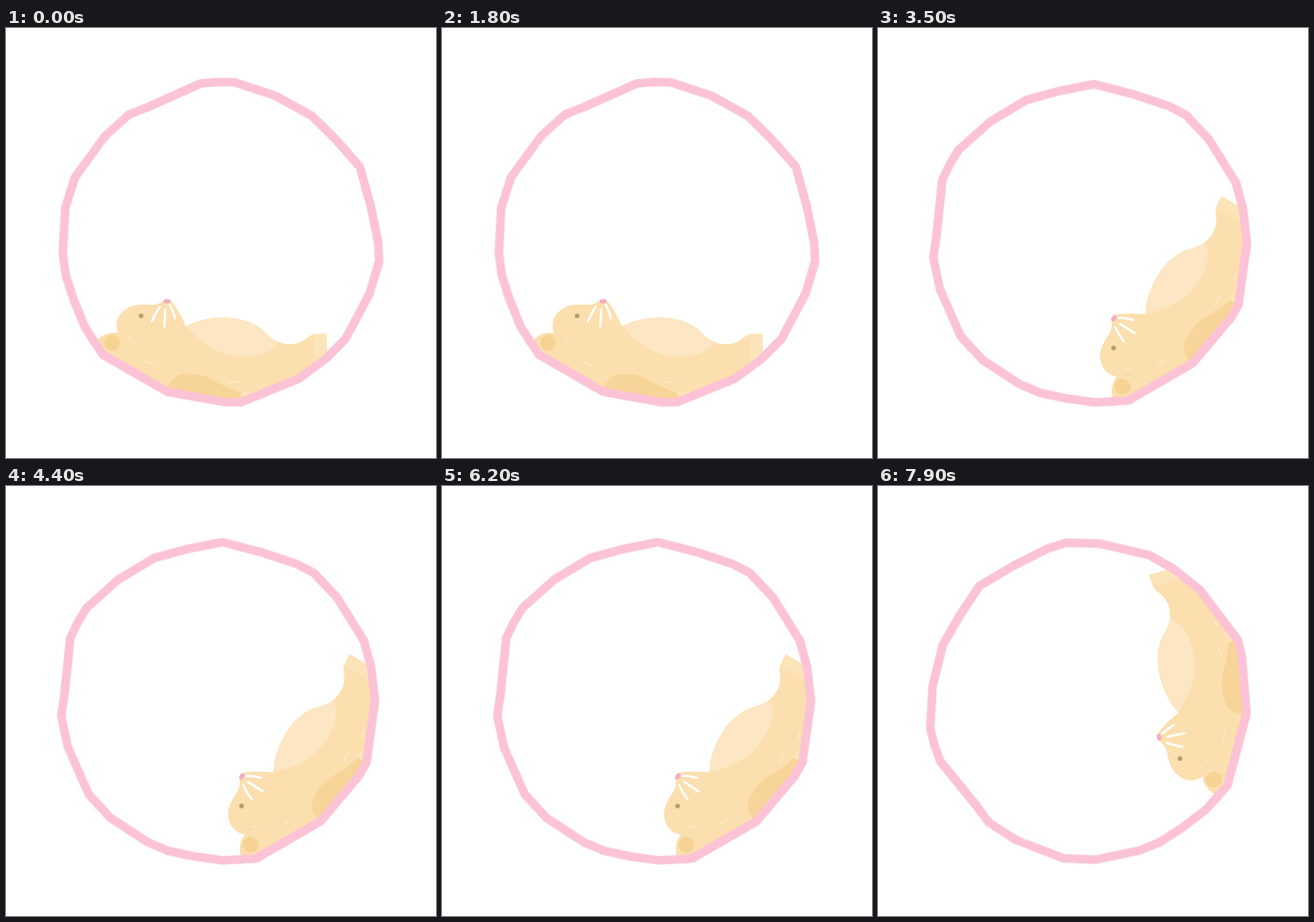
Recreate the animation shown at these times as an HTML page. Size 480 by 480 pixels, loop 8000 ms.

```html
<!DOCTYPE html>
<html lang="en">
<head>
<meta charset="utf-8">
<title>Rolling cat</title>
<style>
  html, body { margin: 0; width: 100%; height: 100%; overflow: hidden; background: #fff; }
  svg { display: block; width: 100vw; height: 100vh; }
</style>
</head>
<body>
<svg viewBox="0 0 480 480">
  <defs>
    <path id="hoop" d="M219 62L238 60.5 257 61 302 76 343 99 370 126 396 156 408 200 416 240 417 262 406 298
      379 348 357 370 327 392 262 418 245 418 180 406 108 364 88 333 76 303 67 275 64 250 67 200 78 166 112 120 139 96 160 88Z"/>
    <clipPath id="inside"><use href="#hoop"/></clipPath>
    <filter id="rough" x="-5%" y="-5%" width="110%" height="110%" color-interpolation-filters="sRGB">
      <feTurbulence type="fractalNoise" baseFrequency=".35" numOctaves="2" seed="4"/>
      <feDisplacementMap in="SourceGraphic" scale="1.8" xChannelSelector="R" yChannelSelector="G"/>
    </filter>
  </defs>
  <g id="wheel">
    <g clip-path="url(#inside)">
      <!-- body, foot, belly, tail tip, tail, ear -->
      <path fill="#fcdfae" d="M90 360L104 346Q114 338 125 340Q120 325 132 315Q141 307 158 308.5Q167 310 173 306Q180 302 186 306
        Q194 317 201 333Q220 323 245 323.5Q268 324 285 336Q296 348 304 351Q322 358 336 347Q340 343 347 342L350 440H90Z"/>
      <path fill="#fce4b9" d="M343 344Q350 341 358 342V385H340Q347 365 343 344Z"/>
      <path fill="#fce6c3" d="M202 333Q220 323 245 323.5Q268 324 285 336Q296 348 304 351Q296 367 262 367Q228 365 202 333Z"/>
      <path fill="#fde5b9" d="M250 404Q275 410 302 401V430H250Z"/>
      <path fill="#f7d497" d="M177 410Q184 386 200 386Q220 385 238 397Q250 404 262 407V430H170Z"/>
      <ellipse cx="118.5" cy="351" rx="8.5" ry="9" fill="#f6d293"/>
    </g>
    <g fill="none" stroke-linecap="round">
      <path d="M248 396L261 395M283 401L290 398M156 372L168 377M137 343L140 349" stroke="#fde9c8" stroke-width="1.5"/>
      <path d="M172 311Q167 318 163 327M178 314L177 333M183 309Q187 316 189 324" stroke="#fff" stroke-width="2.6"/>
    </g>
    <circle cx="151" cy="321" r="2.6" fill="#ba9c66"/>
    <ellipse cx="180" cy="304.8" rx="4" ry="2.5" fill="#f6abc4"/>
    <use href="#hoop" fill="none" stroke="#fbc3d5" stroke-width="9.6" stroke-linejoin="round" filter="url(#rough)"/>
  </g>
</svg>
<script>
const LOOP = 8000, STEP = 100, POSES = 9;
const wheel = document.getElementById("wheel");

// Nine poses per turn, each snapped to 15 degrees; the hub drifts slightly sideways.
function draw(now) {
  const pose = Math.floor(now % LOOP / STEP) % POSES;
  const angle = 15 * Math.round(2.45 * pose) - 0.3;
  const x = 238 + 2.6 * Math.cos((angle - 58) * Math.PI / 180);
  wheel.setAttribute("transform", `translate(${x} 239.8) rotate(${angle}) translate(-240 -240)`);
  requestAnimationFrame(draw);
}
draw(performance.now());
</script>
</body>
</html>
```
